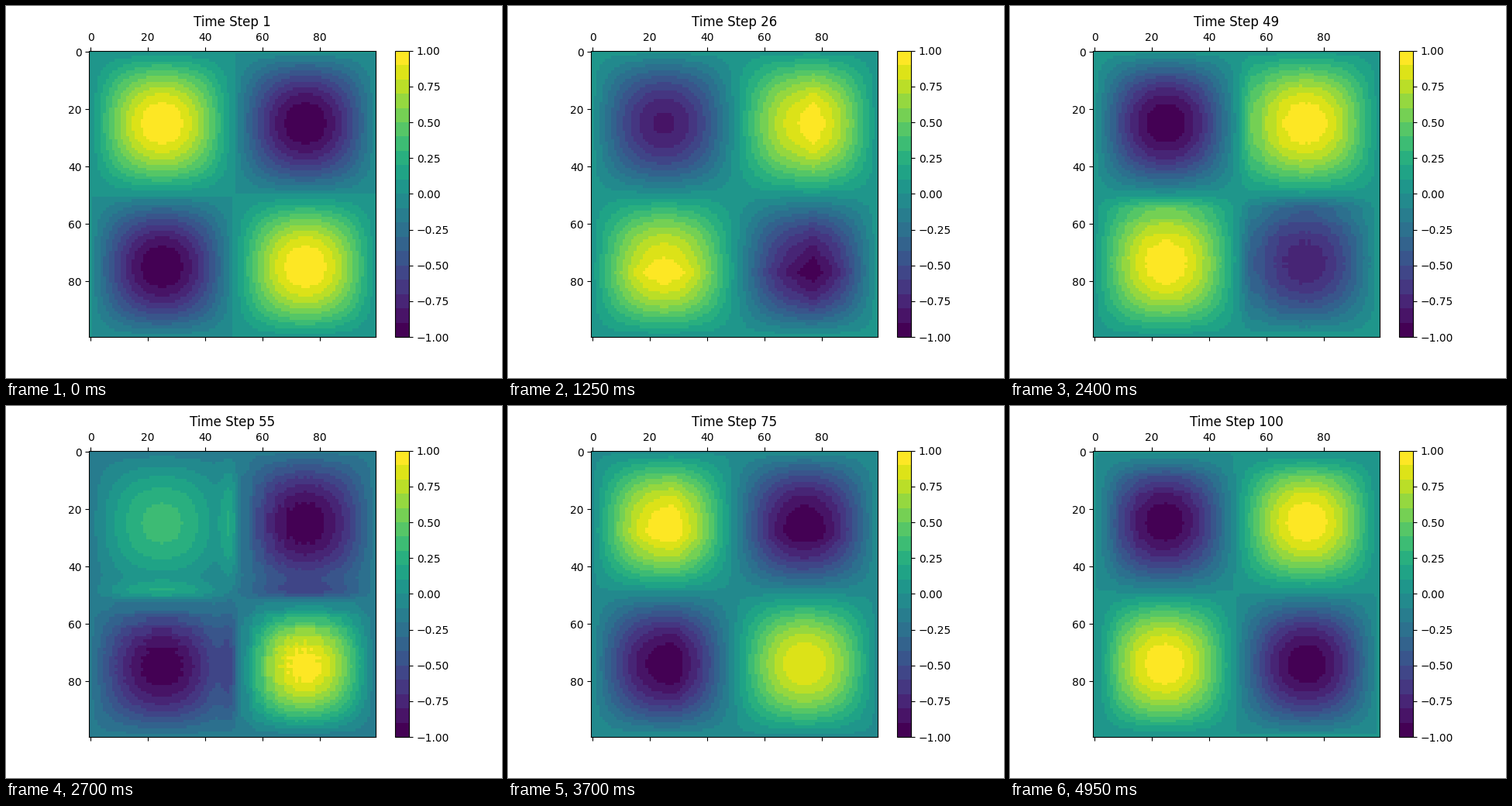
A matplotlib script for the animation above (5 s loop, 640 by 480 pixels).

```python
import numpy as np
import matplotlib.pyplot as plt
from matplotlib.animation import FuncAnimation

N = 100        # grid points per side
STEPS = 100
INTERVAL = 50  # ms

# Standing wave on a square membrane whose rim is held at zero.
# One step moves a wave by one cell; the field is summed from the rim's sine modes.
wave = np.sin(2 * np.pi * np.arange(N) / N)
start = np.outer(wave, wave)

k = np.arange(1, N - 1)
modes = np.sin(np.pi * np.outer(k, k) / (N - 1))
weights = modes @ wave[1:-1] * 2 / (N - 1)
amps = np.outer(weights, weights)
stiff = 4 * np.sin(np.pi * k / (2 * (N - 1))) ** 2
omega = np.sqrt(stiff[:, None] + stiff[None, :])


def field(step):
    if step == 0:
        return start
    u = np.zeros((N, N))
    u[1:-1, 1:-1] = modes.T @ (amps * np.cos(omega * step)) @ modes
    return u


def rescale(u):
    """Stretch the values to the range -1..1."""
    low, high = u.min(), u.max()
    return 2 * (u - low) / (high - low) - 1


fig, ax = plt.subplots(figsize=(6.4, 4.8), dpi=100)
image = ax.matshow(rescale(start), cmap=plt.get_cmap("viridis", 20), vmin=-1, vmax=1)
fig.colorbar(image)
title = ax.set_title("Time Step 1")


def update(step):
    image.set_data(rescale(field(step)))
    title.set_text(f"Time Step {step + 1}")
    return image, title


anim = FuncAnimation(fig, update, frames=STEPS, interval=INTERVAL,
                     repeat=True, repeat_delay=0, blit=False)
plt.show()
```
